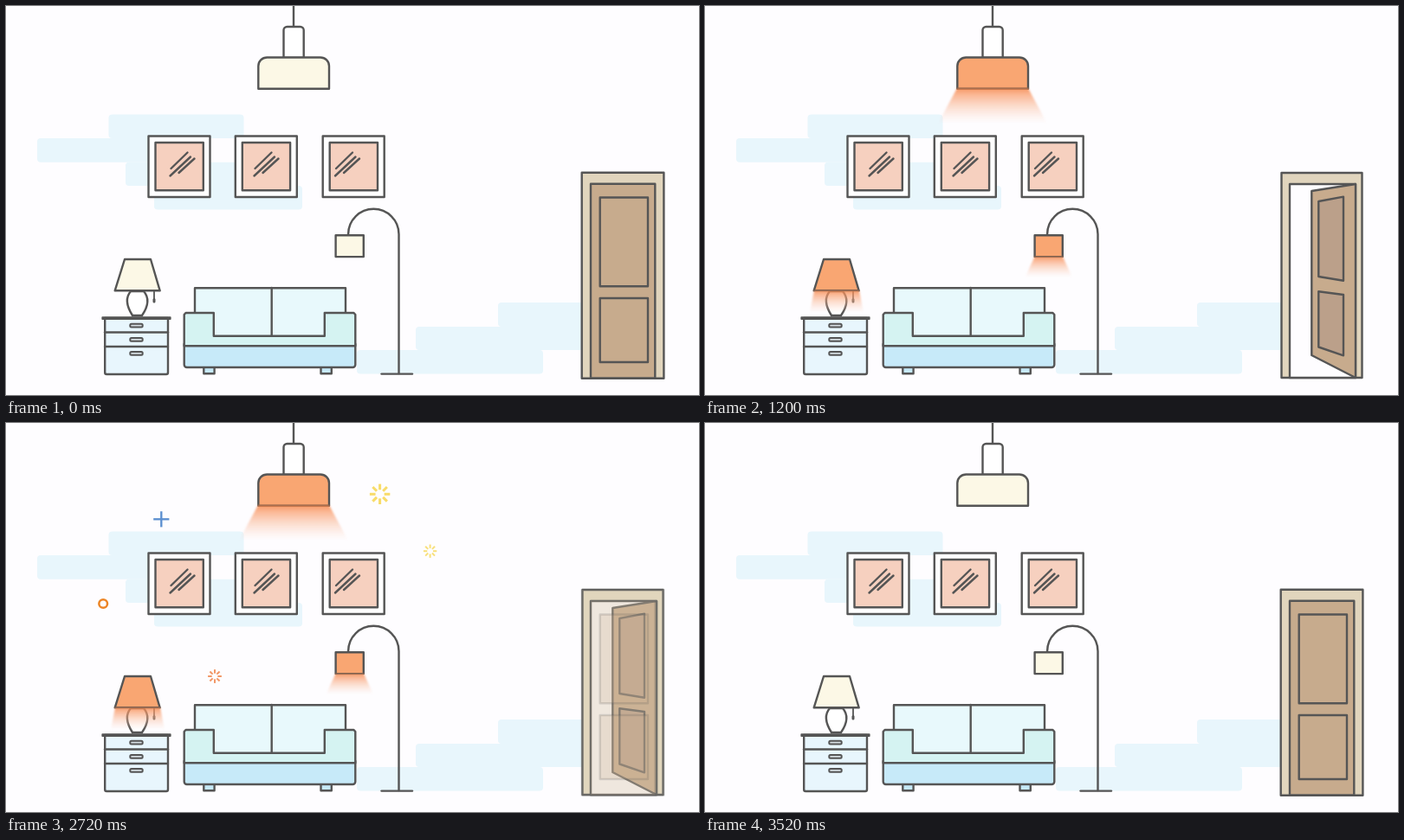
Recreate the animation shown at these times as an HTML page with a canvas. Size 800x450 px, loop 4480 ms.

```html
<!DOCTYPE html>
<html lang="en">
<head>
<meta charset="utf-8">
<title>Living room</title>
<style>
  html, body { margin: 0; width: 100%; height: 100%; overflow: hidden; background: #fefdff; }
  canvas { display: block; width: 800px; height: 450px; }
</style>
</head>
<body>
<canvas id="stage" width="800" height="450"></canvas>
<script>
const ctx = document.getElementById('stage').getContext('2d');
const LOOP = 4480, STEP = 40;
const INK = '#555', PAPER = '#fefdff', WALL = '#e8f6fc';
const CREAM = '#fcf8e6', LIT = '#f9a672', TRIM = '#e1d5bd', WOOD = '#c7ab8d', PANEL = '#bba08a';

const clamp = v => Math.max(0, Math.min(1, v));

// Fills, then strokes, whatever path the callback traces.
function shape(trace, fill, width = 2.4, ink = INK) {
  ctx.beginPath();
  trace();
  if (fill) { ctx.fillStyle = fill; ctx.fill(); }
  if (width) { ctx.lineWidth = width; ctx.strokeStyle = ink; ctx.stroke(); }
}

function box(x1, y1, x2, y2, fill, radius = 0, width) {
  shape(() => ctx.roundRect(x1, y1, x2 - x1, y2 - y1, radius), fill, width);
}

function poly(points, fill, width) {
  shape(() => {
    points.forEach(([x, y]) => ctx.lineTo(x, y));
    ctx.closePath();
  }, fill, width);
}

function line(x1, y1, x2, y2, width, ink) {
  shape(() => { ctx.moveTo(x1, y1); ctx.lineTo(x2, y2); }, null, width, ink);
}

function withAlpha(alpha, draw) {
  if (alpha <= 0) return;
  ctx.save();
  ctx.globalAlpha = alpha;
  draw();
  ctx.restore();
}

function wall() {
  ctx.fillStyle = PAPER;
  ctx.fillRect(0, 0, 800, 450);
  const block = (x1, y1, x2, y2) => box(x1, y1, x2, y2, WALL, 4, 0);
  block(118.5, 125.5, 274.5, 153);
  block(36, 153, 192, 180.7);
  block(138, 180.7, 294, 208);
  block(171, 208, 342, 235.5);
  block(568, 343, 680, 371);
  block(473, 371, 680, 398);
  block(405, 398, 620, 425.5);
}

function picture(x, hatch) {
  box(x, 150.5, x + 71, 221, '#fff');
  box(x + 8, 158, x + 63.3, 213.3, '#f6d0bf');
  line(hatch + 2, 188, hatch + 21, 169.5);
  line(hatch + 1, 196.5, hatch + 24.5, 174.5);
  line(hatch + 11, 193, hatch + 29, 176.5);
}

// Shade in its unlit colour with the lit colour faded over it.
function shade(trace, lit) {
  shape(trace, CREAM, 0);
  withAlpha(lit, () => shape(trace, LIT, 0));
  shape(trace);
}

function glow(x1, x2, top, bottom, spread, lit) {
  withAlpha(lit, () => {
    const g = ctx.createLinearGradient(0, top - 2, 0, bottom);
    g.addColorStop(0, 'rgba(243,126,62,.85)');
    g.addColorStop(.18, 'rgba(248,150,98,.72)');
    g.addColorStop(.55, 'rgba(250,180,145,.42)');
    g.addColorStop(1, 'rgba(252,210,190,0)');
    ctx.filter = 'blur(1px)';
    poly([[x1, top - 1], [x2, top - 1], [x2 + spread, bottom], [x1 - spread, bottom]], g, 0);
  });
}

function pendant(lit) {
  line(332, 0, 332, 24);
  box(320.5, 24, 343.7, 60, '#fff', [4, 4, 0, 0]);
  shade(() => ctx.roundRect(291.3, 59.5, 81.7, 36.2, [10, 10, 0, 0]), lit);
  glow(291, 373, 96, 136, 22, lit);
}

function tableLamp(lit) {
  shape(() => {
    ctx.moveTo(144, 330);
    ctx.bezierCurveTo(137, 338, 139, 347, 146, 358);
    ctx.lineTo(157, 358);
    ctx.bezierCurveTo(164.5, 347, 166, 338, 159, 330);
    ctx.closePath();
  }, '#fff');
  line(171, 330, 171, 341, 1.8);
  line(171, 339.5, 171, 342, 3);
  shade(() => {
    ctx.moveTo(137, 293);
    ctx.lineTo(167, 293);
    ctx.lineTo(177.7, 329.3);
    ctx.lineTo(125.7, 329.3);
    ctx.closePath();
  }, lit);
  glow(126, 178, 330, 355, 5, lit);
}

function nightstand() {
  box(114.2, 361, 187, 426, '#e8f6fd', [0, 0, 2, 2]);
  line(114, 377.5, 187, 377.5);
  line(114, 394, 187, 394);
  box(111.2, 360, 189.8, 362.3, INK, 0, 1.6);
  for (const y of [367.7, 384, 400]) box(143.3, y, 157.7, y + 3.8, '#d5dde1', 1.5, 2);
}

function sofa() {
  const base = '#c7eaf9';
  box(218, 326.3, 392, 384, '#e8f9fc');
  line(306.7, 326, 306.7, 382);
  for (const x of [228.3, 363.5]) box(x, 416, x + 12.3, 425.3, base);
  box(205.7, 391, 403.3, 418, base, [0, 0, 3, 3]);
  poly([[205.7, 393.3], [205.7, 357], [207.5, 355], [239.8, 355], [239.8, 381.7], [367.8, 381.7],
    [367.8, 355], [401.5, 355], [403.3, 357], [403.3, 393.3]], '#d5f3f2');
}

function floorLamp(lit) {
  shape(() => {
    ctx.moveTo(453.5, 425);
    ctx.lineTo(453.5, 264);
    ctx.arc(424.3, 264, 29.2, 0, Math.PI, true);
    ctx.lineTo(395.1, 266);
  });
  line(433.5, 425.6, 469, 425.6);
  shade(() => ctx.rect(380.6, 265.3, 32.2, 24.8), lit);
  glow(380.5, 413, 291, 314, 11, lit);
}

function doorClosed() {
  box(664.7, 192.7, 759.4, 430.8, TRIM);
  box(675, 205.8, 749.3, 430.5, WOOD);
  box(685.7, 221.5, 741, 324.3, WOOD);
  box(685.7, 338, 741, 412, WOOD);
}

function doorOpen() {
  box(665.5, 193, 758.5, 430, TRIM);
  box(675, 206, 751, 430, PAPER);
  poly([[700.3, 214], [751, 206], [751, 430], [700.3, 404]], WOOD);
  poly([[708.3, 226], [737, 220.6], [737, 317.7], [708.3, 313]], PANEL);
  poly([[708.3, 330.3], [737, 334], [737, 404.3], [708.3, 394.5]], PANEL);
}

function door(t) {
  if (t < 640 || t >= 2760) return doorClosed();
  doorOpen();
  if (t < 680) withAlpha(.38, doorClosed);
  else if (t >= 2720) withAlpha(.2, doorClosed);
}

function star(inner, outer, width, color) {
  for (let i = 0; i < 8; i++) {
    const c = Math.cos(i * Math.PI / 4), s = Math.sin(i * Math.PI / 4);
    line(c * inner, s * inner, c * outer, s * outer, width, color);
  }
}

const sparkles = [
  [112.2, 209, () => shape(() => ctx.arc(0, 0, 4.8, 0, Math.PI * 2), null, 2.5, '#ec8526')],
  [179.3, 111.3, () => {
    line(-9, 0, 9, 0, 2.3, '#5b8fd0');
    line(0, -9, 0, 9, 2.3, '#5b8fd0');
  }],
  [431.6, 82.3, () => star(5, 11.6, 3, '#f8dc6a')],
  [489.6, 148.2, () => star(3.3, 7.6, 2, '#f8e07c')],
  [241, 293, () => star(3.3, 7.8, 2, '#f29767')]
];

function sparkle(t, lit) {
  const grown = clamp((t - 1200) / 240);
  const size = (.6 + .4 * grown) * (1 + .02 * Math.sin(t / 80));
  withAlpha(grown * lit, () => {
    ctx.lineCap = 'butt';
    for (const [x, y, draw] of sparkles) {
      ctx.save();
      ctx.translate(x, y);
      ctx.scale(size, size);
      draw();
      ctx.restore();
    }
  });
}

function render(time) {
  const t = Math.floor((time % LOOP) / STEP) * STEP;
  const lit = Math.min(clamp((t - 1000) / 200), clamp((3520 - t) / 200));
  ctx.lineJoin = 'round';
  ctx.lineCap = 'round';
  wall();
  picture(164.5, 188.5);
  picture(264.8, 285.5);
  picture(365.7, 379);
  pendant(lit);
  nightstand();
  tableLamp(lit);
  sofa();
  floorLamp(lit);
  door(t);
  sparkle(t, lit);
}

let start;
function tick(now) {
  start ??= now;
  render(now - start);
  requestAnimationFrame(tick);
}
render(0);
requestAnimationFrame(tick);
</script>
</body>
</html>
```
